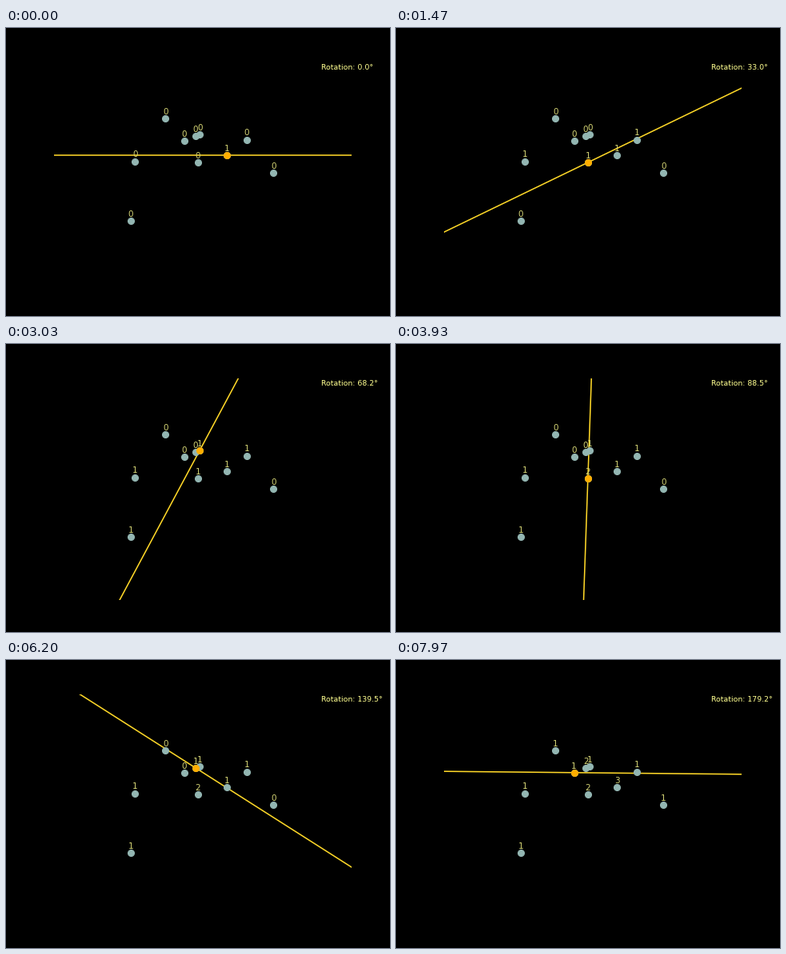
Recreate the animation shown at these times as a matplotlib script. Size 480x360 px, loop 8000 ms.

```python
import numpy as np
import matplotlib.pyplot as plt
from matplotlib.animation import FuncAnimation

LOOP_MS = 8000
TICK_MS = 20
STEPS = 240      # line positions per loop
TURN = 0.75      # degrees per step
START = 6        # index of the first pivot
REACH = 60       # half length of the line, cut by the axes

POINTS = np.array([
    (-2.51, 4.95), (-1.26, 2.96), (-0.48, 3.38), (-0.20, 3.54),
    (-4.56, 1.10), (-0.33, 0.99), (1.62, 1.64), (2.95, 3.05),
    (4.75, 0.03), (-4.84, -4.30),
])


def next_hit(pivot, previous, angle):
    """Return (angle, index) of the next point the turning line meets."""
    hits = []
    for i, (dx, dy) in enumerate(POINTS - POINTS[pivot]):
        if i not in (pivot, previous):
            turn = (np.degrees(np.arctan2(dy, dx)) - angle) % 180
            hits.append((angle + turn, i))
    return min(hits)


def windmill(limit):
    """List the (angle, pivot) changes up to the limit angle."""
    changes = [(0.0, START)]
    previous = None
    while True:
        angle, pivot = changes[-1]
        hit = next_hit(pivot, previous, angle)
        if hit[0] > limit:
            return changes
        changes.append(hit)
        previous = pivot


CHANGES = windmill(STEPS * TURN)

plt.rcParams["font.family"] = "DejaVu Sans"
fig, ax = plt.subplots(figsize=(6.4, 4.8), dpi=75, facecolor="black")
fig.subplots_adjust(left=0.125, right=0.9, bottom=0.11, top=0.88)
ax.set(xlim=(-10, 10), ylim=(-10, 10))
ax.axis("off")

line, = ax.plot([], [], color="#ffd828", lw=1.5, zorder=1)
ax.plot(*POINTS.T, "o", color="#93b6b2", ms=7.7, zorder=2)
pivot_dot, = ax.plot([], [], "o", color="#ffae00", ms=7.7, zorder=3)
labels = [
    ax.annotate("0", p, xytext=(0, 5), textcoords="offset points",
                ha="center", color="#d4d474", fontsize=10, zorder=4)
    for p in POINTS
]
readout = ax.text(7.97, 9.36, "", color="#ffff90", fontsize=9)


def draw(tick):
    # the line turns in whole steps, each starting on a 10 ms mark
    step = int((tick + 0.75) * TICK_MS * STEPS / LOOP_MS)
    angle = step * TURN
    visited = [i for hit, i in CHANGES if hit <= angle]
    x, y = POINTS[visited[-1]]
    dx = REACH * np.cos(np.radians(angle))
    dy = REACH * np.sin(np.radians(angle))
    line.set_data([x - dx, x + dx], [y - dy, y + dy])
    pivot_dot.set_data([x], [y])
    for i, label in enumerate(labels):
        label.set_text(str(visited.count(i)))
    readout.set_text(f"Rotation: {angle:.1f}°")
    return [line, pivot_dot, readout, *labels]


anim = FuncAnimation(fig, draw, frames=LOOP_MS // TICK_MS, interval=TICK_MS,
                     init_func=lambda: draw(0), repeat=True, repeat_delay=0)
plt.show()
```
